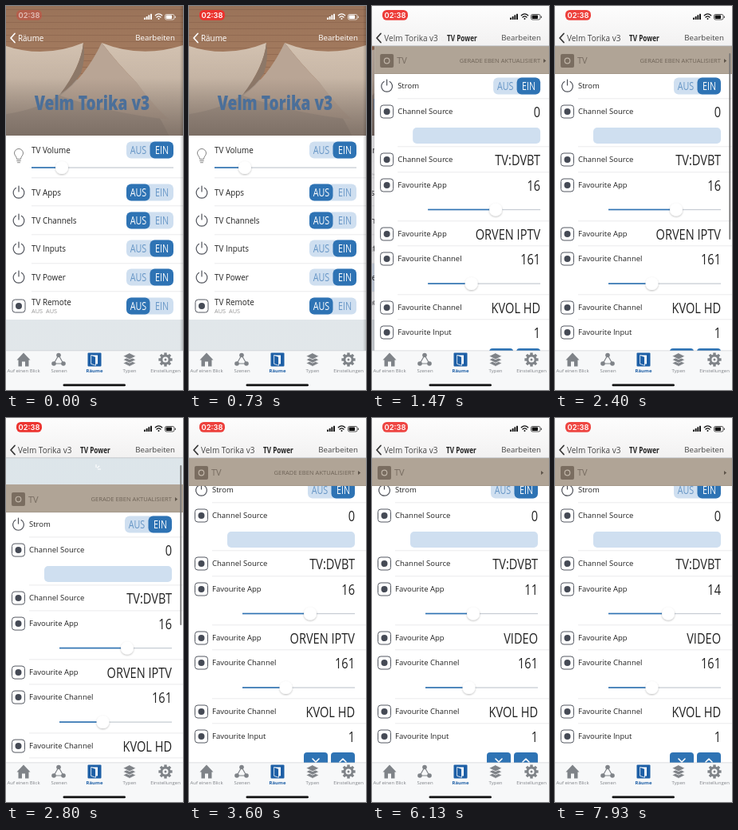
An HTML page for the animation above (8000 ms loop, 222 by 480 pixels).

```html
<!DOCTYPE html>
<html lang="de">
<head>
<meta charset="utf-8">
<title>TV-Steuerung</title>
<style>
  html, body { margin: 0; width: 100%; height: 100%; overflow: hidden; background: #fff; }
  svg { display: block; width: 100%; height: 100%; }
  text { font-family: "Open Sans", "Noto Sans", sans-serif; }
  .medium { font-weight: 500; }
  .bold { font-weight: 700; }
  .heavy { font-weight: 800; }
  .clock { font-family: Inter, Roboto, sans-serif; font-weight: 600; }
</style>
</head>
<body>
<svg id="stage" viewBox="0 0 222 480"></svg>
<script>
const BLUE = '#2e73b4', PALE = '#cfdff0', INK = '#222';
const DEVICE = 'Velm Torika v3';
const CONDENSED = 0.78;

// ---- drawing helpers -------------------------------------------------
const rect = (x, y, w, h, fill, r = 0) =>
  `<rect x="${x}" y="${y}" width="${w}" height="${h}" rx="${r}" fill="${fill}"/>`;
const path = (d, fill, stroke = 'none', width = 1) =>
  `<path d="${d}" fill="${fill}" stroke="${stroke}" stroke-width="${width}" stroke-linecap="round" stroke-linejoin="round"/>`;
const circle = (x, y, r, fill, stroke = 'none') =>
  `<circle cx="${x}" cy="${y}" r="${r}" fill="${fill}" stroke="${stroke}"/>`;
const group = (id, body, attrs = '') => `<g id="${id}" ${attrs}>${body}</g>`;

// Text is placed by its vertical centre.
function text(x, y, str, size, { fill = INK, anchor = 'start', cls = '', id = '', narrow = false } = {}) {
  const scale = narrow ? ` scale(${CONDENSED} 1)` : '';
  return `<text ${id && `id="${id}"`} class="${cls}" font-size="${size}" fill="${fill}" text-anchor="${anchor}"
    transform="translate(${x} ${y + size * 0.36})${scale}">${str}</text>`;
}
const label = (y, x, str, size) => text(x, y, str, size, { cls: 'medium' });
const value = (y, str, id) => text(208, y, str, 18.7, { anchor: 'end', narrow: true, cls: 'medium', id });
const line = (x, y) => rect(x, y - 0.5, 222 - x, 0.7, '#e2e2e4');

function toggle(x, y, on) {
  const half = (dx, str, active) => text(x + dx, y, str, 13.8,
    { fill: active ? '#fff' : '#6796c6', anchor: 'middle', narrow: true, cls: 'medium' });
  const left = x + (on ? 29.5 : 0);
  return rect(x, y - 10.5, 59, 21, PALE, 6) + rect(left, y - 10.5, 29.5, 21, BLUE, 6) +
    half(15, 'AUS', !on) + half(44.5, 'EIN', on);
}

function slider(x1, x2, y, knob, id = '') {
  return rect(x1, y - 0.6, x2 - x1, 1.3, '#c8ced5') +
    `<rect ${id && `id="${id}Fill"`} x="${x1}" y="${y - 0.8}" width="${knob - x1}" height="1.6" fill="${BLUE}"/>` +
    `<circle ${id && `id="${id}Knob"`} cx="${knob}" cy="${y}" r="8" fill="#fff" filter="url(#soft)"/>`;
}

const powerIcon = (x, y) =>
  path(`M${x - 3.6} ${y - 5.6}A6.9 6.9 0 1 0 ${x + 3.6} ${y - 5.6}M${x} ${y - 8}V${y - 1}`, 'none', '#4d5058', 1.2);
const dotIcon = (x, y) =>
  `<rect x="${x - 8}" y="${y - 8}" width="16" height="16" rx="3.5" fill="#fff" stroke="#555962"/>` + circle(x, y, 4, '#454a55');
const bulbIcon = (x, y) =>
  path(`M${x - 2.5} ${y + 4}C${x - 2.5} ${y + 1} ${x - 5.5} ${y} ${x - 5.5} ${y - 3}a5.5 5.5 0 0 1 11 0C${x + 5.5} ${y} ${x + 2.5} ${y + 1} ${x + 2.5} ${y + 4}z
    M${x - 2.3} ${y + 6.5}h4.6M${x - 1.5} ${y + 8.7}h3`, 'none', '#777', 0.9);
const chevron = color => path('M11 34.5L6 40L11 45.5', 'none', color, 1.7);

// ---- room page -------------------------------------------------------
function photo() {
  let planks = '';
  for (let y = 4; y < 90; y += 8) planks += rect(0, y, 222, 1, '#7f5a4470');
  return rect(0, 0, 222, 163, 'url(#wood)') + planks +
    path('M0 92H222V163H0z', '#a5968a') +
    path('M-70 60Q-35 50 0 50Q48 66 97 46Q94 76 68 110Q30 140 -70 140z', 'url(#pillow)') +
    path('M97 46Q94 76 68 110Q84 100 94 84Q100 66 97 46z', '#8d7868') +
    path('M120 46Q170 66 222 49H290V163H205Q188 128 164 96Q140 72 120 46z', 'url(#pillow)') +
    path('M120 46Q140 72 164 96Q188 128 205 142Q130 134 68 112Q100 88 120 46z', '#b9a595') +
    rect(0, 90, 222, 73, 'url(#dusk)');
}

function roomPage() {
  const row = (y, name, on, bottom) =>
    powerIcon(16, y) + label(y, 32, name, 9.9) + toggle(151, y, on) + line(32, bottom);
  return rect(0, 0, 222, 480, 'url(#mist)') + photo() +
    text(108, 121, DEVICE, 24.5, { fill: '#4b6f99', anchor: 'middle', cls: 'heavy', narrow: true }) +
    rect(0, 162, 222, 230, '#fff') +
    group('highlight', rect(0, 322, 222, 35, '#dce7f3')) +
    bulbIcon(16, 187) + label(180, 32, 'TV Volume', 9.9) + toggle(151, 180, true) +
    slider(32, 210, 202, 70) + line(32, 215) +
    row(233, 'TV Apps', false, 250) + row(268, 'TV Channels', false, 286) +
    row(303, 'TV Inputs', true, 322) + row(339, 'TV Power', true, 357) +
    dotIcon(16, 375) + label(370, 32, 'TV Remote', 9.9) +
    text(32, 381.5, 'AUS&#160; AUS', 7.4, { fill: '#999' }) + toggle(151, 375, false);
}

// ---- device page -----------------------------------------------------
function devicePage() {
  const row = (y, name, val, id) => dotIcon(15.5, y) + label(y, 29, name, 9.5) + value(y, val, id);
  const button = (x, d) => rect(x, 428, 30, 21, BLUE, 4) + path(d, 'none', '#fff', 1.6);
  const rows = rect(0, 85, 222, 420, '#fff') +
    powerIcon(15.5, 100) + label(100, 29, 'Strom', 9.5) + toggle(149, 100, true) +
    row(132, 'Channel Source', '0') + rect(48, 152, 160, 20, PALE, 5) +
    row(192, 'Channel Source', 'TV:DVBT') +
    row(224, 'Favourite App', '16', 'appNumber') + slider(67, 208, 254.5, 152, 'app') +
    row(285, 'Favourite App', 'ORVEN IPTV', 'appName') +
    row(316, 'Favourite Channel', '161') + slider(67, 208, 347, 121.5) +
    row(377, 'Favourite Channel', 'KVOL HD') + row(408, 'Favourite Input', '1') +
    [116, 176, 208, 269, 300, 361, 392].map(y => line(29, y)).join('') +
    button(144, 'M155 436l4 4l4-4') + button(178, 'M189 440l4-4l4 4');
  const header = rect(0, 50, 222, 35, '#b0a496') + rect(0, 84.4, 222, 0.6, '#9d9183') +
    rect(7, 60, 17, 17, '#7a6d60', 2) +
    `<circle cx="15.5" cy="68.5" r="3.3" fill="none" stroke="#c0b5a8" stroke-width="1.2"/>` +
    text(28, 68.5, 'TV', 11, { fill: '#766b60' }) +
    text(208, 68.5, 'GERADE EBEN AKTUALISIERT', 7.6, { fill: '#6f6458', anchor: 'end', id: 'updated' }) +
    path('M212 66l3.2 2.5l-3.2 2.5z', '#5d5349');
  let ticks = '';
  for (let i = 0; i < 8; i++)
    ticks += `<path d="M0-2.5V-5.5" stroke="#fff" stroke-width="1.1" stroke-linecap="round" transform="rotate(${i * 45})" opacity="0"/>`;
  return rect(-4, 0, 4, 480, 'url(#edge)') + rect(0, 0, 222, 480, 'url(#mist)') +
    group('spinner', ticks, 'transform="translate(113 64)"') +
    group('rows', rows) + group('header', header) +
    '<rect id="scrollbar" x="218.4" y="59" width="1.8" height="233" rx="0.9" fill="#777"/>';
}

// ---- bars ------------------------------------------------------------
function navigation() {
  const edit = fill => text(212, 40, 'Bearbeiten', 9.7, { fill, anchor: 'end' });
  return group('navBack', rect(0, 0, 222, 50, 'url(#bar)') + rect(0, 49.5, 222, 0.7, '#b4b8be')) +
    group('navRoom', chevron('#fff') + edit('#fff') + group('rooms', text(15, 40, 'Räume', 9.9, { fill: '#fff' }))) +
    group('oldTitle', text(0, 40, DEVICE, 10.5, { cls: 'bold', narrow: true })) +
    group('backArrow', chevron('#333')) +
    group('navDevice', edit('#444') +
      group('backLabel', text(15, 40, DEVICE, 10, { fill: '#444' })) +
      group('newTitle', text(93, 40, 'TV Power', 10.5, { cls: 'bold', narrow: true })));
}

function statusBar() {
  const bars = [0, 1, 2, 3].map(i => rect(173 + i * 2.7, 14.5 - i * 1.6, 1.9, 2.5 + i * 1.6, 'currentColor', 0.5)).join('');
  const wifi = path('M187.3 11.8Q191.5 8 195.7 11.8M189 14Q191.5 11.8 194 14', 'none', 'currentColor', 1.3) +
    circle(191.5, 16, 1, 'currentColor');
  const battery = '<rect x="199.5" y="10.5" width="11.5" height="6.5" rx="1.8" fill="none" stroke="currentColor" stroke-width=".7"/>' +
    rect(200.6, 11.6, 7.5, 4.3, 'currentColor', 0.8) + rect(211.8, 12.6, 0.9, 2.3, 'currentColor', 0.4);
  return group('pill', rect(13, 5, 32, 12.8, '#ec322e', 5.5)) +
    text(29, 11.4, '02:38', 9.4, { fill: '#fff', anchor: 'middle', cls: 'clock', id: 'clock' }) +
    group('indicators', bars + wifi + battery);
}

function tabBar() {
  const grey = '#7f8388';
  const caption = (x, str, active) =>
    text(x, 456, str, 6, { fill: active ? '#1d5fa6' : grey, anchor: 'middle', cls: active ? 'bold' : '' });
  const sheet = y => path(`M155 ${y}l8 4l-8 4l-8-4z`, grey, '#f7f8f9', 0.8);
  let cog = '';
  for (let a = 0; a < 360; a += 45)
    cog += `<rect x="198.3" y="433.4" width="3.4" height="4" fill="${grey}" transform="rotate(${a} 200 442)"/>`;
  return rect(0, 431, 222, 49, '#f7f8f9') + rect(0, 430.6, 222, 0.6, '#c6c9cc') +
    path('M13.5 442.5L22 433.5L30.5 442.5H28.5V450.5H24V444.5H20V450.5H15.5V442.5z', grey) +
    path('M66 436.5L60 447H72z', 'none', grey, 1.2) +
    circle(66, 436.5, 2.8, grey) + circle(60, 447, 2.8, grey) + circle(72, 447, 2.8, grey) +
    rect(102.5, 433.5, 17, 17, '#1d5fa6', 1) + path('M107 436.5h8v11h-8z', '#fff') +
    path('M107 436.5l5.5 2v10.8l-5.5-1.8z', '#1d5fa6', '#fff', 0.8) +
    sheet(442.5) + sheet(438.2) + sheet(433.8) +
    cog + `<circle cx="200" cy="442" r="5" fill="none" stroke="${grey}" stroke-width="2.8"/>` + circle(200, 442, 1.5, grey) +
    caption(22, 'Auf einen Blick') + caption(66.5, 'Szenen') + caption(111, 'Räume', true) +
    caption(155, 'Typen') + caption(200, 'Einstellungen') + rect(71.5, 472.5, 78.5, 2.8, '#111', 1.4);
}

const gradient = (id, from, to, dir = 'x2="0" y2="1"') =>
  `<linearGradient id="${id}" ${dir}><stop offset="0" stop-color="${from}"/><stop offset="1" stop-color="${to}"/></linearGradient>`;

document.getElementById('stage').innerHTML = `<defs>
  ${gradient('wood', '#9a7359', '#b08566')}${gradient('pillow', '#d3c2b1', '#b5a495')}
  ${gradient('dusk', '#6a5d5500', '#6a5d55b0')}
  ${gradient('mist', '#dce5ea', '#e2e7ea')}${gradient('bar', '#fdfdfd', '#f2f1f1')}
  ${gradient('edge', '#00000000', '#00000030', '')}
  <filter id="soft" x="-50%" y="-50%" width="200%" height="200%">
    <feDropShadow dx="0" dy="1" stdDeviation="1.1" flood-opacity=".28"/></filter></defs>` +
  group('room', roomPage()) + group('dim', rect(0, 0, 222, 480, '#201840')) +
  group('device', devicePage()) + navigation() + statusBar() + tabBar();

// ---- motion ----------------------------------------------------------
const el = id => document.getElementById(id);
const clamp = x => Math.min(1, Math.max(0, x));
const ramp = (t, a, b) => clamp((t - a) / (b - a));
const ease = (t, a, b) => { const p = ramp(t, a, b); return p * p * (3 - 2 * p); };
const fade = (id, o) => el(id).setAttribute('opacity', o);
const move = (id, x, y = 0) => el(id).setAttribute('transform', `translate(${x} ${y})`);

// Critically damped spring.
function push(t) {
  const s = Math.max(0, t - 940) * 0.01175;
  return t > 1700 ? 1 : 1 - Math.exp(-s) * (1 + s);
}

function draw(t) {
  const p = push(t);
  move('room', -66.6 * p);
  move('device', 222 * (1 - p));
  fade('dim', 0.06 * p);
  fade('highlight', t > 800 ? 1 : 0);

  fade('navBack', clamp(p * 1.6));
  fade('navRoom', clamp(1 - p * 1.6));
  move('rooms', -45 * p);
  move('oldTitle', 84 - 25 * p);
  fade('oldTitle', p > 0 ? 1 - p : 0);
  fade('backArrow', clamp(p * 1.6));
  fade('navDevice', p * p);
  move('backLabel', 26 * (1 - p));
  move('newTitle', 74 * (1 - p));
  el('indicators').style.color = p > 0.3 ? '#111' : '#fff';

  // Pull down to refresh, then settle slightly scrolled under the sticky header.
  const scroll = 34.3 * ease(t, 2420, 2850) - 44.3 * ease(t, 3020, 3550);
  const pull = Math.max(0, scroll);
  move('rows', 0, scroll);
  move('header', 0, pull);
  el('scrollbar').setAttribute('height', 233 - pull);
  fade('scrollbar', ramp(t, 2150, 2300) * (1 - ramp(t, 3350, 3590)));
  [...el('spinner').children].forEach((tick, i) =>
    tick.setAttribute('opacity', clamp((scroll - 6) / 9 - i)));
  fade('updated', 1 - ramp(t, 4800, 4950));

  const app = 16 - 5 * ease(t, 5350, 5850) + 3 * ease(t, 6950, 7550);
  const knob = 72 + 5 * app;
  el('appKnob').setAttribute('cx', knob);
  el('appFill').setAttribute('width', knob - 67);
  el('appNumber').textContent = Math.round(app);
  el('appName').textContent = t < 6000 ? 'ORVEN IPTV' : 'VIDEO';

  const wake = ramp(t, 0, 300);
  fade('pill', (0.35 + 0.65 * wake) * (0.95 - 0.05 * Math.cos(t * Math.PI / 1000)));
  fade('clock', 0.6 + 0.4 * wake);
}

function loop() {
  draw(performance.now() % 8000);
  requestAnimationFrame(loop);
}
loop();
</script>
</body>
</html>
```
